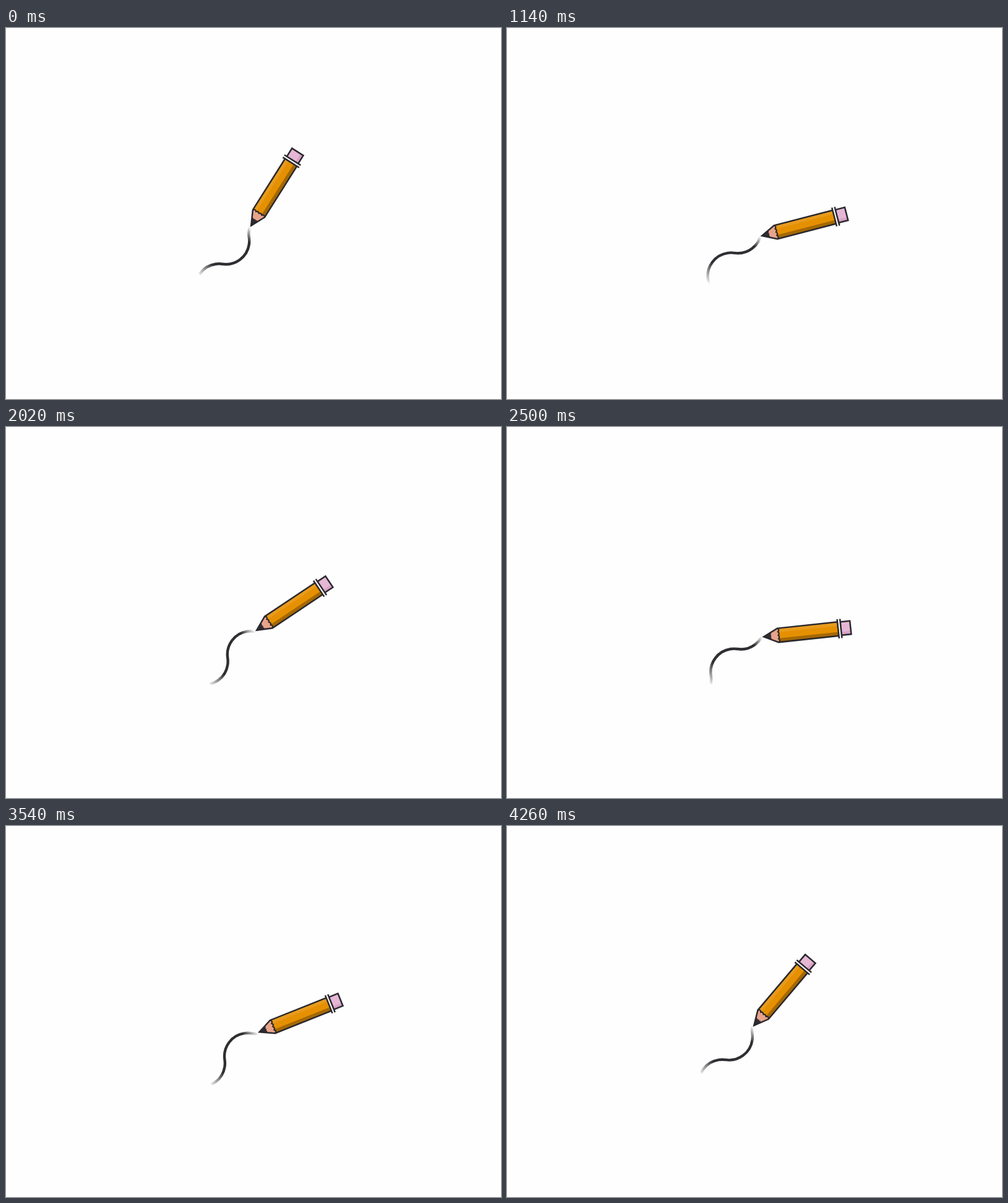
Write an HTML page with a canvas that moves like this. It is 800 px wide and 600 px high and loops after 4280 ms.

```html
<!DOCTYPE html>
<html lang="en">
<head>
<meta charset="utf-8">
<title>Writing pencil</title>
<style>
  html, body { margin: 0; width: 100%; height: 100%; overflow: hidden; background: #fefefe; }
  canvas { display: block; }
</style>
</head>
<body>
<canvas id="stage" width="800" height="600"></canvas>
<script>
const ctx = document.getElementById('stage').getContext('2d');

const LOOP = 4280, STEP = 20;
const SWING = 1440, UPRIGHT_AT = 207;
const HOME = { x: 402, y: 329.6 };
const INK = '#2a282d';
const RAD = Math.PI / 180;

// The trail: alternating circular arcs sliding along a 45 degree axis
const HALF_WAVE = 60.8, SAG = 15.3;
const RADIUS = ((HALF_WAVE / 2) ** 2 + SAG ** 2) / (2 * SAG);
const SPREAD = Math.asin(HALF_WAVE / 2 / RADIUS);
const TAIL = -112, HEAD = -1;

const trailInk = ctx.createLinearGradient(-115, 0, 0, 0);
[[0, 0], [0.26, 1], [0.84, 1], [1, 0]].forEach(([at, alpha]) =>
  trailInk.addColorStop(at, `rgba(48,46,50,${alpha})`));

function drawTrail(phase) {
  ctx.save();
  ctx.translate(HOME.x, HOME.y);
  ctx.rotate(-45 * RAD);
  ctx.beginPath();
  ctx.rect(TAIL, -40, HEAD - TAIL, 80);
  ctx.clip();

  const shift = phase / Math.PI;
  const first = Math.floor(TAIL / HALF_WAVE + shift) - 1;
  ctx.beginPath();
  for (let i = first; i < first + 5; i++) {
    const mid = (i - shift) * HALF_WAVE;
    const up = i % 2 === 0;
    const side = up ? -1 : 1;
    const facing = side * Math.PI / 2;
    ctx.arc(mid, side * (SAG - RADIUS), RADIUS,
      facing + side * SPREAD, facing - side * SPREAD, !up);
  }
  ctx.strokeStyle = trailInk;
  ctx.lineWidth = 4.4;
  ctx.lineJoin = 'round';
  ctx.stroke();
  ctx.restore();
}

function poly(points, closed) {
  const path = new Path2D();
  points.forEach(([x, y], i) => i ? path.lineTo(x, y) : path.moveTo(x, y));
  if (closed) path.closePath();
  return path;
}

function box(x, y, w, h, color) {
  ctx.fillStyle = color;
  ctx.fillRect(x, y, w, h);
}

function ink(path, width) {
  ctx.strokeStyle = INK;
  ctx.lineWidth = width;
  ctx.stroke(path);
}

// Pencil parts, with the point at 0,0 and the eraser towards +x
const W = 11.3, E = 10.8;
const cone = poly([[26, -W], [3, 0], [26, W]], true);
const outline = poly([[124, -W], [26, -W], [3, 0], [26, W], [124, W]]);
const eraser = poly([[128, -E], [144, -E], [144, E], [128, E]]);
const lead = new Path2D('M1.5 0L14 -5.6Q16.5 -3.6 14.2 -1.8Q16.5 0 14.2 1.8Q16.5 3.6 14 5.6Z');
const scallop = 'Q30 -8.5 26.5 -5.5Q29.5 -3 26.5 0Q29.5 3 26.5 5.5Q30 8.5 26 11.3';
const woodEdge = new Path2D('M26 -11.3' + scallop);
const wood = new Path2D('M3 0L26 -11.3' + scallop + 'Z');

function drawPencil(swing) {
  ctx.save();
  ctx.translate(HOME.x - 12 * swing, HOME.y - 12 * swing);
  ctx.rotate(-(35.8 + 35.5 * swing) * RAD);
  ctx.lineJoin = 'miter';

  box(26, -W, 98, 2 * W, '#e59000');
  box(26, -W, 98, 6.5, '#e89b1c');
  box(26, 5, 98, W - 5, '#a46804');
  ctx.fillStyle = '#e8a48b';
  ctx.fill(cone);
  ctx.fill(wood);
  ctx.fillStyle = '#2e2c32';
  ctx.fill(lead);
  ink(woodEdge, 2.2);
  ink(outline, 2.5);

  box(128, -E, 16, 2 * E, '#e5b7d5');
  box(128, 5.5, 16, E - 5.5, '#d9a2c6');
  ink(eraser, 2.5);

  box(124, -15.3, 4.4, 30.6, '#fefefe');
  [123.8, 128.4].forEach(x => ink(poly([[x, -15.6], [x, 15.6]]), 2.5));
  ctx.restore();
}

function draw(time) {
  const phase = 2 * Math.PI * (time - UPRIGHT_AT) / SWING;
  box(0, 0, 800, 600, '#fefefe');
  drawTrail(phase);
  drawPencil(Math.cos(phase));
}

const start = performance.now();
function tick() {
  const time = (performance.now() - start) % LOOP;
  draw(Math.floor(time / STEP) * STEP);
  requestAnimationFrame(tick);
}
tick();
</script>
</body>
</html>
```
